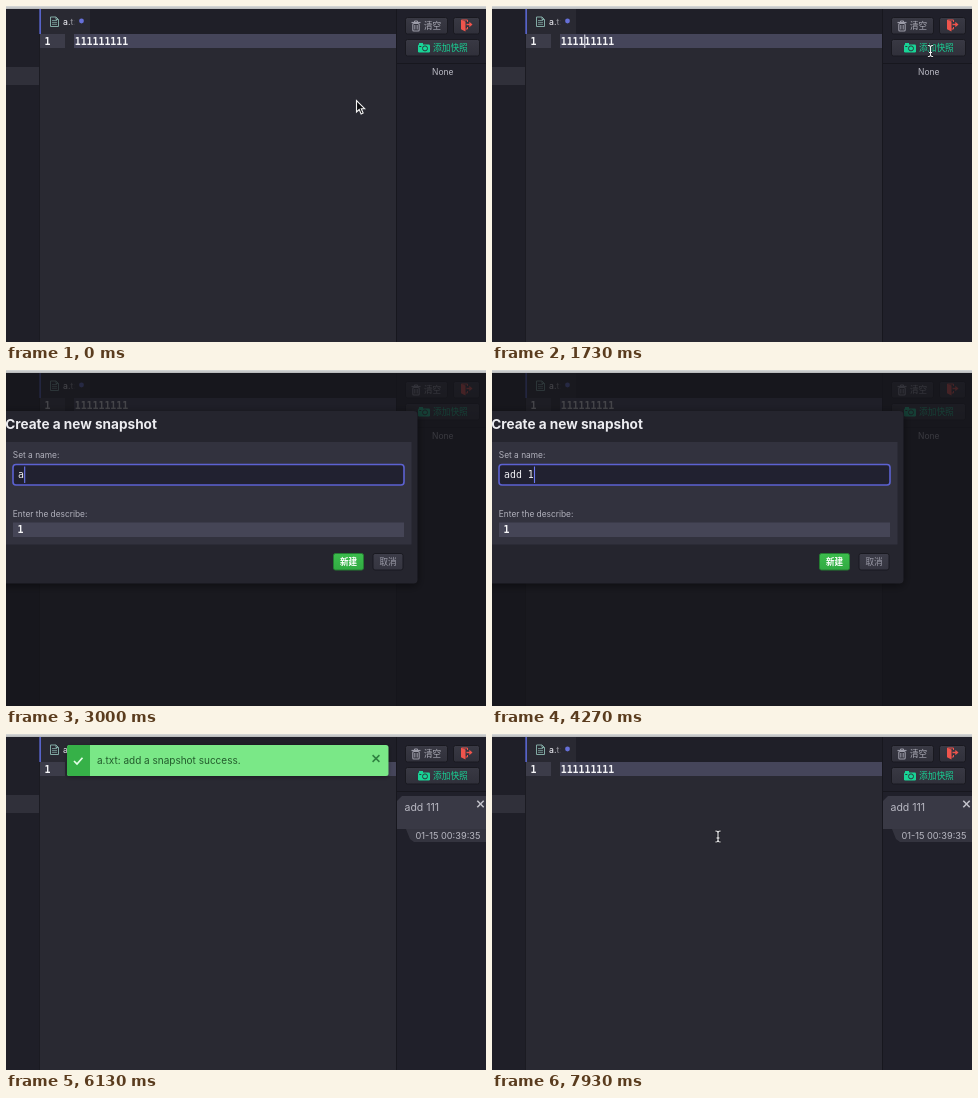
Recreate the animation shown at these times as an HTML page with a canvas. Size 480 by 336 pixels, loop 8 s.

```html
<!DOCTYPE html>
<html lang="en">
<head>
<meta charset="utf-8">
<title>Snapshot panel</title>
<style>
html, body { margin: 0; width: 100%; height: 100%; overflow: hidden; background: #1f1f28; }
canvas { display: block; width: 480px; height: 336px; }
</style>
</head>
<body>
<canvas id="stage"></canvas>
<script>
const W = 480, H = 336, LOOP = 8000;
const canvas = document.getElementById('stage');
const ctx = canvas.getContext('2d');
const dpr = window.devicePixelRatio || 1;
canvas.width = W * dpr;
canvas.height = H * dpr;

const SANS = 'Inter, "Noto Sans CJK SC", "Noto Sans CJK", sans-serif';
const CJK = '"Noto Sans CJK SC", "Noto Sans CJK", sans-serif';
const MONO = '"DejaVu Sans Mono", monospace';
const CHAR = 5.95;

const OPEN = 1870, CLOSE = 5900, TOAST_IN = 5930, TOAST_OUT = 6700;
const NAME = 'add 111';
const KEYS = [2800, 3100, 3300, 3930, 4130, 4330, 4530];

const clamp = v => Math.max(0, Math.min(1, v));
const span = (t, a, b) => clamp((t - a) / (b - a));
const ease = p => p * p * (3 - 2 * p);
const easeOut = p => 1 - (1 - p) ** 3;
const mix = (a, b, p) => a + (b - a) * p;

function rect(x, y, w, h, fill) {
  ctx.fillStyle = fill;
  ctx.fillRect(x, y, w, h);
}

function round(x, y, w, h, r, fill, stroke, width = 1) {
  ctx.beginPath();
  ctx.roundRect(x, y, w, h, r);
  if (fill) { ctx.fillStyle = fill; ctx.fill(); }
  if (stroke) { ctx.strokeStyle = stroke; ctx.lineWidth = width; ctx.stroke(); }
}

function poly(points, fill) {
  ctx.beginPath();
  points.forEach(([x, y]) => ctx.lineTo(x, y));
  ctx.closePath();
  ctx.fillStyle = fill;
  ctx.fill();
}

function line(points, color, width = 1) {
  ctx.beginPath();
  points.forEach(([x, y], i) => i ? ctx.lineTo(x, y) : ctx.moveTo(x, y));
  ctx.strokeStyle = color;
  ctx.lineWidth = width;
  ctx.stroke();
}

function text(str, x, y, size, color, family = SANS, weight = 400) {
  ctx.font = `${weight} ${size}px ${family}`;
  ctx.fillStyle = color;
  ctx.fillText(str, x, y);
}

function cross(x, y, r, color, width) {
  line([[x - r, y - r], [x + r, y + r]], color, width);
  line([[x + r, y - r], [x - r, y + r]], color, width);
}

function button(x, y, w, h, top = '#393944', bottom = '#30303a', edge = '#191920') {
  const g = ctx.createLinearGradient(0, y, 0, y + h);
  g.addColorStop(0, top);
  g.addColorStop(1, bottom);
  round(x + .5, y + .5, w - 1, h - 1, 2, g, edge);
}

function trash(x, y) {
  const c = '#9c9ca8';
  line([[x, y + 2], [x + 9, y + 2]], c, 1.2);
  line([[x + 3, y + 1.8], [x + 3, y + .5], [x + 6, y + .5], [x + 6, y + 1.8]], c);
  round(x + 1.3, y + 3, 6.4, 7.5, 1, null, c, 1.1);
  [3, 4.5, 6].forEach(d => line([[x + d, y + 4.5], [x + d, y + 9]], c, .7));
}

function door(x, y) {
  const c = '#f0544c';
  line([[x + 1, y + 10], [x + 1, y + 1], [x + 7, y + 1], [x + 7, y + 3]], c, 1);
  line([[x + 7, y + 8], [x + 7, y + 10], [x + 5, y + 10]], c, 1);
  poly([[x + .5, y + .8], [x + 5, y + 2.5], [x + 5, y + 12.5], [x + .5, y + 10.3]], c);
  line([[x + 6, y + 5.5], [x + 10, y + 5.5]], c, 1.4);
  poly([[x + 8.8, y + 2.8], [x + 12, y + 5.5], [x + 8.8, y + 8.2]], c);
}

function camera(x, y) {
  const c = '#18d496';
  round(x, y + 1.5, 12, 8, 1.2, c);
  rect(x + 1, y, 4, 2, c);
  ctx.beginPath();
  ctx.arc(x + 7, y + 5.4, 2.5, 0, 7);
  ctx.strokeStyle = '#2b3a3d';
  ctx.lineWidth = 1;
  ctx.stroke();
  rect(x + 1.3, y + 3, 2, 1, '#2b3a3d');
}

function tab() {
  rect(34, 3, 356, 25, '#1f1f28');
  rect(35, 3, 49, 25, '#292932');
  rect(33.3, 3, 1.7, 25, '#5763c8');
  const c = '#82aaa4';
  line([[50, 11], [44.5, 11], [44.5, 20.5], [52.5, 20.5], [52.5, 13.5], [50, 11], [50, 13.5], [52.5, 13.5]], c, 1);
  [14.5, 16.4, 18.3].forEach(y => line([[46, y], [51, y]], c, .8));
  ctx.save();
  ctx.beginPath();
  ctx.rect(56, 5, 12.5, 20);
  ctx.clip();
  const fade = ctx.createLinearGradient(62, 0, 69, 0);
  fade.addColorStop(0, '#e6e6ec');
  fade.addColorStop(1, 'rgba(230,230,236,.1)');
  text('a.txt', 57, 18.6, 8.6, fade, SANS, 500);
  ctx.restore();
  ctx.beginPath();
  ctx.arc(75.5, 15, 2.4, 0, 7);
  ctx.fillStyle = '#6670d8';
  ctx.fill();
}

function editor(t) {
  rect(34, 28, 356, H - 28, '#292932');
  rect(34, 28, 25, 14, '#3c3c49');
  rect(68, 28, 322, 14, '#45455a');
  text('1', 38.5, 38.6, 9.9, '#f4f4f6', MONO, 700);
  text('1'.repeat(9), 68.7, 38.6, 9.9, '#f4f4f6', MONO, 700);
  const beat = t % 800;
  const focused = t < OPEN || t >= CLOSE;
  if (focused && beat >= 70 && beat < 400) rect(92.3, 28.5, 1, 13.5, '#f0f0f8');
}

function card() {
  poly([[400, 95], [480, 95], [480, 108], [408, 108], [404, 105]], '#34343f');
  poly([[391, 67], [396, 62], [480, 62], [480, 95], [391, 95]], '#393945');
  text('add 111', 398.5, 76.8, 10.5, '#b9b9c3');
  cross(474.5, 70, 3.2, '#c4c4cc', 1.5);
  text('01-15 00:39:35', 409.5, 104.8, 9.2, '#b9b9c3');
}

function sidePanels(t) {
  rect(0, 0, 33.3, H, '#1f1f28');
  rect(0, 61, 33, 18, '#30303a');
  rect(33, 28, 1, H - 28, '#1b1b22');
  rect(390, 3, 90, H, '#20202a');
  rect(390, 3, 1, H, '#17171e');
  rect(391, 57, 89, 1, '#17171e');
  button(399, 11, 43, 17.5);
  trash(405.5, 14.5);
  text('清空', 418, 23, 8.6, '#b0b0bb', CJK);
  button(447, 11, 27, 17.5);
  door(454.5, 13);
  button(399, 33, 75, 17.5);
  camera(412, 37);
  text('添加快照', 427, 45.1, 8.7, '#18d496', CJK, 500);
  if (t < CLOSE) text('None', 426, 68.7, 8.5, '#b9b9c3');
  else card();
}

function topStrip() {
  const g = ctx.createLinearGradient(0, 0, 0, 3);
  g.addColorStop(0, '#d8dad9');
  g.addColorStop(1, '#b4b6b8');
  rect(0, 0, W, 3, g);
}

function dialog(t) {
  if (t < OPEN || t >= CLOSE) return;
  const p = easeOut(span(t, OPEN, OPEN + 240));
  ctx.save();
  ctx.globalAlpha = .78 * p;
  rect(0, 3, W, H - 3, '#15151a');
  ctx.globalAlpha = p;
  ctx.translate(0, mix(-12, 0, p));

  ctx.save();
  ctx.shadowColor = 'rgba(0,0,0,.5)';
  ctx.shadowBlur = 8 * dpr;
  ctx.shadowOffsetY = 2 * dpr;
  round(-20, 41, 431.5, 172.5, 4, '#25252e');
  ctx.restore();

  rect(0, 72, 405.5, 102.5, '#32323e');
  text('Create a new snapshot', -.8, 58.8, 13.6, '#ececf0', SANS, 700);
  text('Set a name:', 6.8, 88, 8.35, '#b2b2bd');
  round(7, 94.5, 391, 20.5, 3, '#212130', '#5c62d2', 1.6);
  text('Enter the describe:', 6.8, 146.8, 8.35, '#b2b2bd');
  rect(7, 152.5, 391, 14.5, '#454556');
  text('1', 11.5, 163.4, 9.9, '#f4f4f6', MONO, 700);

  const count = KEYS.filter(k => k <= t).length;
  text(NAME.slice(0, count), 12, 108.2, 9.9, '#f0f0f4', MONO);
  const since = t - (count ? KEYS[count - 1] : OPEN);
  if (since % 800 < 400) rect(12.2 + count * CHAR, 96.5, 1.1, 16.5, '#6c78f0');

  button(327, 183, 31, 17.5, '#3cbd4d', '#31aa42', '#247c31');
  text('新建', 334, 195, 8.6, '#ffffff', CJK, 700);
  button(366.5, 183, 31, 17.5, '#3c3c48', '#353540');
  text('取消', 373.5, 195, 8.6, '#9d9daa', CJK);
  ctx.restore();
}

function toast(t) {
  if (t < TOAST_IN) return;
  const dx = 135 * (Math.max(0, t - TOAST_OUT) / 100) ** 1.25;
  if (dx > W) return;
  const p = easeOut(span(t, TOAST_IN, TOAST_IN + 150));
  ctx.save();
  ctx.globalAlpha = p;
  ctx.translate(61 + dx, mix(-19, 11, p));
  ctx.save();
  ctx.shadowColor = 'rgba(0,0,0,.35)';
  ctx.shadowBlur = 4 * dpr;
  ctx.shadowOffsetY = dpr;
  round(0, 0, 321.5, 31, 2.5, '#7ae887');
  ctx.restore();
  round(0, 0, 23, 31, [2.5, 0, 0, 2.5], '#36b148');
  line([[7, 16], [10, 19], [15.5, 12.8]], '#e4ffe8', 1.7);
  text('a.txt: add a snapshot success.', 30, 19, 10, '#235c2c');
  cross(309, 13.5, 3.4, '#2f8040', 1.5);
  ctx.restore();
}

function arrow(x, y) {
  ctx.beginPath();
  [[0, 0], [0, 11.5], [2.7, 9], [4.6, 13.4], [6.6, 12.5], [4.8, 8.3], [8.2, 8.2]]
    .forEach(([a, b]) => ctx.lineTo(x + a, y + b));
  ctx.closePath();
  ctx.fillStyle = '#0c0c10';
  ctx.fill();
  ctx.strokeStyle = '#f4f4f4';
  ctx.lineWidth = 1.1;
  ctx.stroke();
}

function beam(x, y) {
  const draw = (c, w) => {
    line([[x - 2.6, y - 5.5], [x - .8, y - 5.2], [x, y - 4], [x, y + 4], [x - .8, y + 5.2], [x - 2.6, y + 5.5]], c, w);
    line([[x + 2.6, y - 5.5], [x + .8, y - 5.2], [x, y - 4]], c, w);
    line([[x, y + 4], [x + .8, y + 5.2], [x + 2.6, y + 5.5]], c, w);
    line([[x - 1.5, y + 1.5], [x + 1.5, y + 1.5]], c, w);
  };
  draw('rgba(10,10,14,.7)', 2.4);
  draw('#f2f2f4', 1.1);
}

function pointer(t) {
  if (t < 900) {
    const p = ease(span(t, 70, 850));
    arrow(mix(350.5, 436, p), mix(94.5, 40, p));
  } else if (t < KEYS[0]) {
    beam(438.5, 45);
  } else if (t > 6300) {
    const p = ease(span(t, 6300, 6720));
    const q = ease(span(t, 7000, 7600));
    beam(mix(438.5, 228.5, p) - 2.5 * q, mix(45, 102.5, p));
  }
}

function draw(t) {
  ctx.setTransform(dpr, 0, 0, dpr, 0, 0);
  ctx.clearRect(0, 0, W, H);
  sidePanels(t);
  editor(t);
  tab();
  dialog(t);
  topStrip();
  toast(t);
  pointer(t);
}

const start = performance.now();
function tick() {
  draw((performance.now() - start) % LOOP);
  requestAnimationFrame(tick);
}
tick();
</script>
</body>
</html>
```
